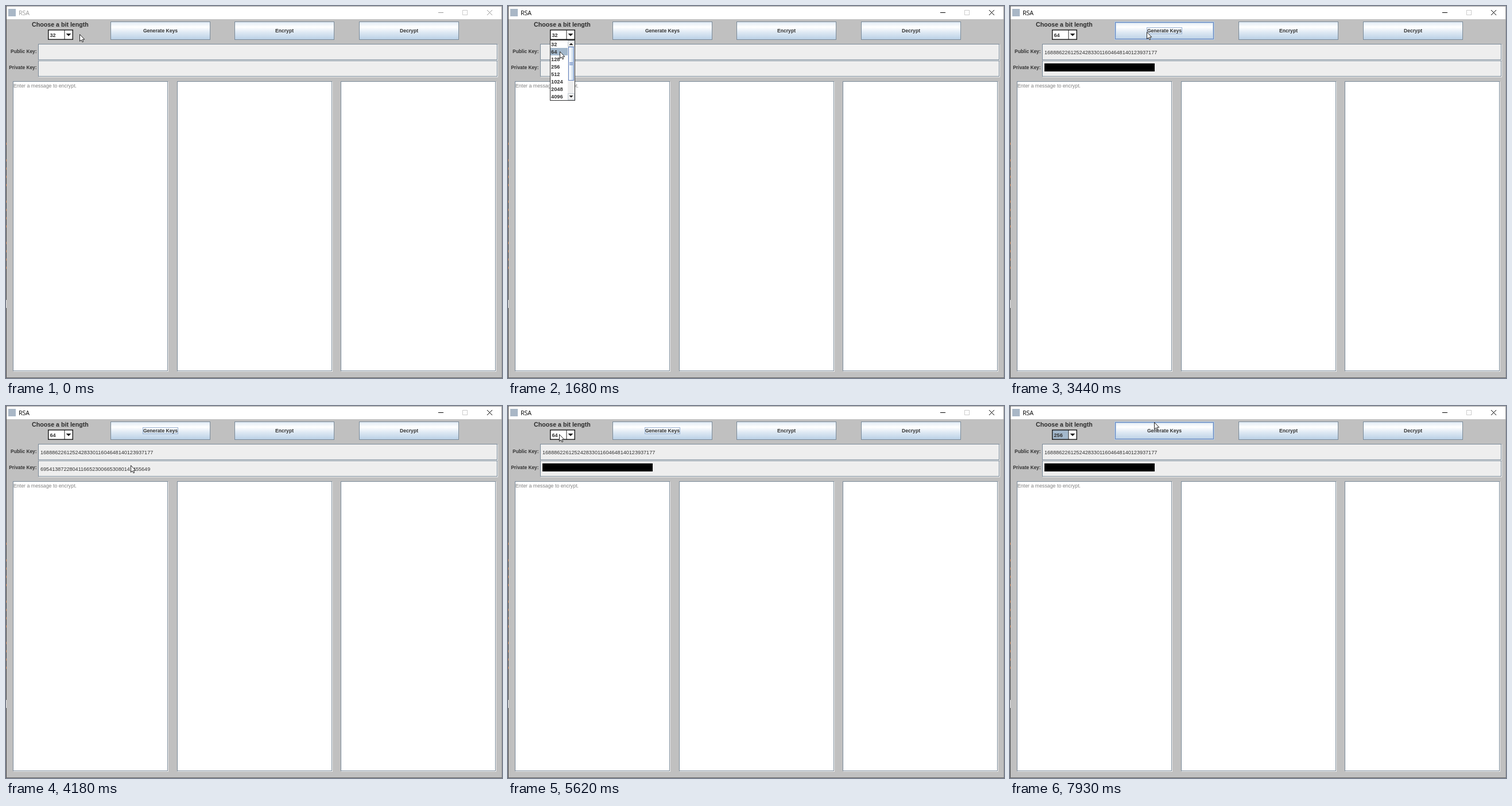
Write an HTML page with a canvas that moves like this. It is 864 px wide and 648 px high and loops after 8 s.

```html
<!DOCTYPE html>
<html lang="en">
<head>
<meta charset="utf-8">
<title>RSA</title>
<style>
  html, body { margin: 0; width: 100%; height: 100%; overflow: hidden; }
  canvas { display: block; }
</style>
</head>
<body>
<canvas id="stage" width="864" height="648"></canvas>
<script>
const ctx = document.getElementById('stage').getContext('2d');
const LOOP = 8000;
const SANS = '"Liberation Sans", Arial, sans-serif';
const TITLE = '"Open Sans", "Noto Sans", sans-serif';
const EDGE = '#7a8a99', BLUE = '#6382bf', PALE = '#b8cfe5', SELECT = '#a3b8cc', INK = '#333';
const SIZES = [32, 64, 128, 256, 512, 1024, 2048, 4096];
const PUBLIC_KEY = '168886226125242833011604648140123937177';
const PRIVATE_KEY = '69541387228041166523006653080141455649';

// Mouse moves: first step, last step, number of steps, end x, end y
const START = [128, 49];
const MOVES = [
  [540, 650, 3, 97, 47],
  [1330, 1680, 8, 90, 79],
  [2450, 2940, 11, 238, 45],
  [4090, 4180, 3, 217, 103],
  [4230, 4550, 7, 178, 110],
  [4700, 5470, 17, 93, 44],
  [5530, 5620, 3, 89, 49],
  [6200, 6420, 6, 84, 91],
  [6580, 6720, 4, 83, 99],
  [6870, 6870, 1, 84, 100],
  [7620, 7930, 8, 251, 28],
];

function mouseAt(t) {
  let [x, y] = START;
  for (const [t0, t1, n, endX, endY] of MOVES) {
    if (t < t0) break;
    const step = t >= t1 ? n : Math.floor((t - t0) / (t1 - t0) * (n - 1)) + 1;
    const p = step / n, k = p * p * (3 - 2 * p);
    x += (endX - x) * k;
    y += (endY - y) * k;
  }
  return [Math.round(x), Math.round(y)];
}

function fill(x, y, w, h, color) {
  ctx.fillStyle = color;
  ctx.fillRect(x, y, w, h);
}

function frame(x, y, w, h, color) {
  ctx.strokeStyle = color;
  ctx.lineWidth = 1;
  ctx.strokeRect(x + .5, y + .5, w - 1, h - 1);
}

function text(s, x, y, size, color = INK, weight = '', align = 'left', family = SANS) {
  ctx.font = `${weight} ${size}px ${family}`;
  ctx.fillStyle = color;
  ctx.textAlign = align;
  ctx.fillText(s, x, y);
}

function polygon(points, fillColor, strokeColor) {
  ctx.beginPath();
  points.forEach(([x, y]) => ctx.lineTo(x, y));
  ctx.closePath();
  ctx.fillStyle = fillColor;
  ctx.fill();
  if (strokeColor) {
    ctx.strokeStyle = strokeColor;
    ctx.lineWidth = 1;
    ctx.stroke();
  }
}

function line(x1, y1, x2, y2, color) {
  ctx.beginPath();
  ctx.moveTo(x1, y1);
  ctx.lineTo(x2, y2);
  ctx.strokeStyle = color;
  ctx.lineWidth = 1;
  ctx.stroke();
}

function arrow(x, y, half, height) {
  polygon([[x - half, y], [x + half, y], [x, y + height]], '#222');
}

function oceanGradient(x1, y1, x2, y2) {
  const g = ctx.createLinearGradient(x1, y1, x2, y2);
  g.addColorStop(0, '#dde8f3');
  g.addColorStop(.3, '#fff');
  g.addColorStop(.6, '#dde8f3');
  g.addColorStop(1, PALE);
  return g;
}

function inset(x, y, w, h, color) {
  fill(x + 1, y + 1, w, h, '#f4f4f4');
  fill(x, y, w, h, color);
  frame(x, y, w, h, EDGE);
}

function button(x, label, { hover, pressed, focused } = {}) {
  const y = 27, w = 174, h = 32;
  fill(x, y, w, h, pressed ? PALE : oceanGradient(0, y, 0, y + h));
  if (hover && !pressed) {
    frame(x, y, w, h, PALE);
    frame(x + 2, y + 2, w - 4, h - 4, PALE);
    frame(x + 1, y + 1, w - 2, h - 2, BLUE);
  } else {
    frame(x, y, w, h, EDGE);
  }
  if (focused) frame(x + 56, 37, 62, 12, '#9bb3d3');
  text(label, x + w / 2, 46, 8.6, INK, 'bold', 'center');
}

function desktopEdge() {
  fill(0, 0, 1, 648, '#4a4a4a');
  for (let i = 0; i < 17; i++) fill(0, 238 + i * 14.4, 1, 4, i % 5 === 1 ? '#4a4a4a' : '#a8673c');
  fill(0, 512, 1, 14, '#ddd');
}

function titleBar(active) {
  const color = active ? '#000' : '#999';
  fill(1, 0, 863, 23, '#fff');
  fill(0, 0, 864, 1, '#a0a0a0');
  fill(4, 5, 13, 13, '#a9b7c6');
  text('RSA', 22, 16, 10.6, color, '', 'left', TITLE);
  line(753, 11.5, 762, 11.5, color);
  frame(795, 7, 9, 9, '#ccc');
  line(838, 7, 847, 16, color);
  line(847, 7, 838, 16, color);
}

function comboBox(value, focused) {
  fill(73, 41, 44, 18, '#222');
  fill(74.5, 42.5, 27, 15, focused ? SELECT : '#fff');
  fill(102.5, 42.5, 13, 15, '#fff');
  arrow(109, 48, 4.5, 4.5);
  text(value, 76.5, 53.5, 9.2, INK, 'bold');
}

function popup(highlighted) {
  fill(73, 60, 44, 105, '#fff');
  fill(74, 60 + highlighted * 13, 30, 13, SELECT);
  SIZES.forEach((size, i) => text(size, 75, 70 + i * 13, 9.3, INK, 'bold'));
  fill(104, 60, 12, 104, '#eee');
  frame(104, 60, 12, 11, '#c4ccd4');
  frame(104, 152, 12, 12, '#c4ccd4');
  arrow(110, 68, 3.5, -3.5);
  arrow(110, 156, 3.5, 3.5);
  fill(105, 71, 10, 59, oceanGradient(105, 0, 115, 0));
  frame(105, 71, 10, 59, BLUE);
  for (let y = 98; y < 104; y += 2) fill(107, y, 6, 1, BLUE);
  frame(73, 59, 44, 106, '#333');
}

function cursor(x, y) {
  const shape = [[0, 0], [0, 12], [2.7, 9.5], [4.5, 13.3], [6.3, 12.5], [4.6, 8.7], [8.3, 8.7]];
  polygon(shape.map(([dx, dy]) => [x + dx + .5, y + dy + .5]), '#fff', '#222');
}

function draw(t) {
  const between = (a, b) => t >= a && t < b;
  const [mx, my] = mouseAt(t);
  const popupOpen = between(990, 2210) || between(5860, 7430);
  const over = (x, y, w, h) => !popupOpen && mx >= x && mx < x + w && my >= y && my < y + h;
  // After a choice the mouse rests where the list was, without entering the field below
  const keyHovered = between(3440, 5860) && over(56, 95, 801, 28);
  const selected = t < 2210 ? 0 : t < 7430 ? 1 : 3;

  fill(0, 0, 864, 648, '#c0c0c0');
  titleBar(t >= 930);
  desktopEdge();
  fill(863, 0, 1, 648, '#a0a0a0');
  fill(0, 647, 864, 1, '#666');

  text('Choose a bit length', 45, 36, 10.67, '#2b2b2b', 'bold');
  comboBox(SIZES[selected], between(2210, 3250) || t >= 7430);
  button(182, 'Generate Keys', {
    hover: over(182, 27, 174, 32),
    pressed: between(3250, 3440),
    focused: between(3250, 5860),
  });
  button(398, 'Encrypt');
  button(615, 'Decrypt');

  text('Public Key:', 53.5, 82, 8.35, INK, 'bold', 'right');
  text('Private Key:', 53.5, 109.5, 8.35, INK, 'bold', 'right');
  inset(56, 66, 800, 28, '#eee');
  inset(56, 95, 800, 28, '#eee');
  if (t >= 3440) {
    text(PUBLIC_KEY, 60, 83.5, 9.08);
    if (keyHovered) text(PRIVATE_KEY, 60, 112.5, 9.08);
    else fill(60, 100, 192, 14, '#000');
  }

  for (const x of [12, 298, 583]) inset(x, 131, 270, 505, '#fff');
  text('Enter a message to encrypt.', 13, 141.5, 8.8, '#808080');

  if (popupOpen) popup(my < 60 ? selected : Math.floor((my - 60) / 13));
  cursor(mx, my);
}

function tick() {
  draw(performance.now() % LOOP);
  requestAnimationFrame(tick);
}
tick();
</script>
</body>
</html>
```
